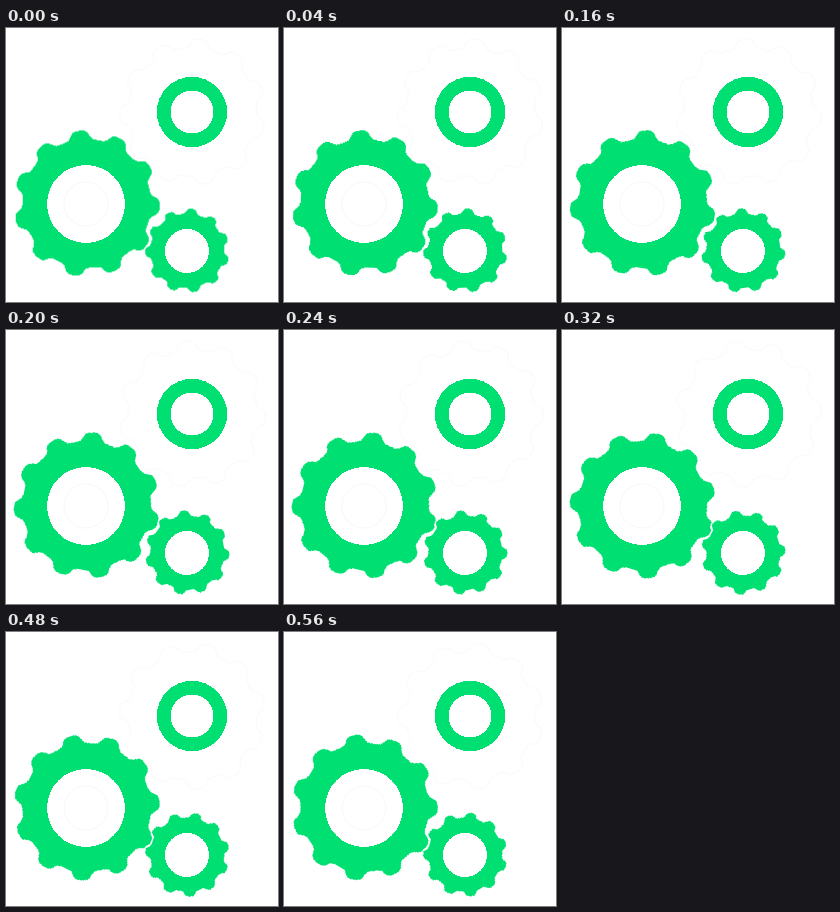
Animation, 272 px wide and 274 px high, one loop 0.6 s. Source, as an HTML page:

```html
<!DOCTYPE html>
<html lang="en">
<head>
<meta charset="utf-8">
<title>Turning gears</title>
<style>
  html, body { margin: 0; width: 100%; height: 100%; overflow: hidden; background: #fff; }
  svg { display: block; width: 272px; height: 274px; }
  .green, .white { shape-rendering: crispEdges; }
  .green { fill: #00e072; }
  .white { fill: #fff; }
  .faint { fill: #fff; stroke: #f8f8f8; stroke-width: 1; }
  .gap { stroke: #fff; stroke-width: 3; paint-order: stroke; }
  .cw, .ccw { animation: turn 600ms steps(15, end) infinite; }
  /* one tooth of eleven per loop */
  .cw { --pitch: calc(360deg / 11); }
  .ccw { --pitch: calc(-360deg / 11); }
  @keyframes turn {
    from { transform: rotate(0deg); }
    to { transform: rotate(var(--pitch)); }
  }
</style>
</head>
<body>
<svg viewBox="0 0 272 274">
  <g transform="translate(186.5 84)">
    <g class="ccw"><path class="faint" data-radius="73" data-phase="6"/></g>
  </g>
  <circle class="green" cx="186" cy="84" r="35.2"/>
  <circle class="white" cx="186" cy="84" r="21.5"/>

  <g transform="translate(80.7 175.4)">
    <g class="cw"><path class="green" data-radius="73" data-phase="-5.8"/></g>
  </g>
  <circle class="white" cx="80" cy="176" r="39"/>
  <circle class="faint" cx="80" cy="176" r="22"/>

  <g transform="translate(181.3 222.6)">
    <g class="ccw"><path class="green gap" data-radius="42" data-phase="6"/></g>
  </g>
  <circle class="white" cx="181" cy="223" r="22"/>
</svg>
<script>
  const TEETH = 11;

  // Rounded teeth: a cosine flattened at crest and root.
  function gearPath(radius, phase) {
    const points = [];
    for (let deg = 0; deg < 360; deg++) {
      const wave = Math.cos((deg - phase) * TEETH * Math.PI / 180) - 0.1;
      const r = radius * (0.941 + 0.059 * Math.tanh(2 * wave) / Math.tanh(1.8));
      const a = deg * Math.PI / 180;
      points.push(`${(r * Math.sin(a)).toFixed(2)} ${(-r * Math.cos(a)).toFixed(2)}`);
    }
    return `M${points.join('L')}Z`;
  }

  for (const path of document.querySelectorAll('path')) {
    path.setAttribute('d', gearPath(+path.dataset.radius, +path.dataset.phase));
  }
</script>
</body>
</html>
```
